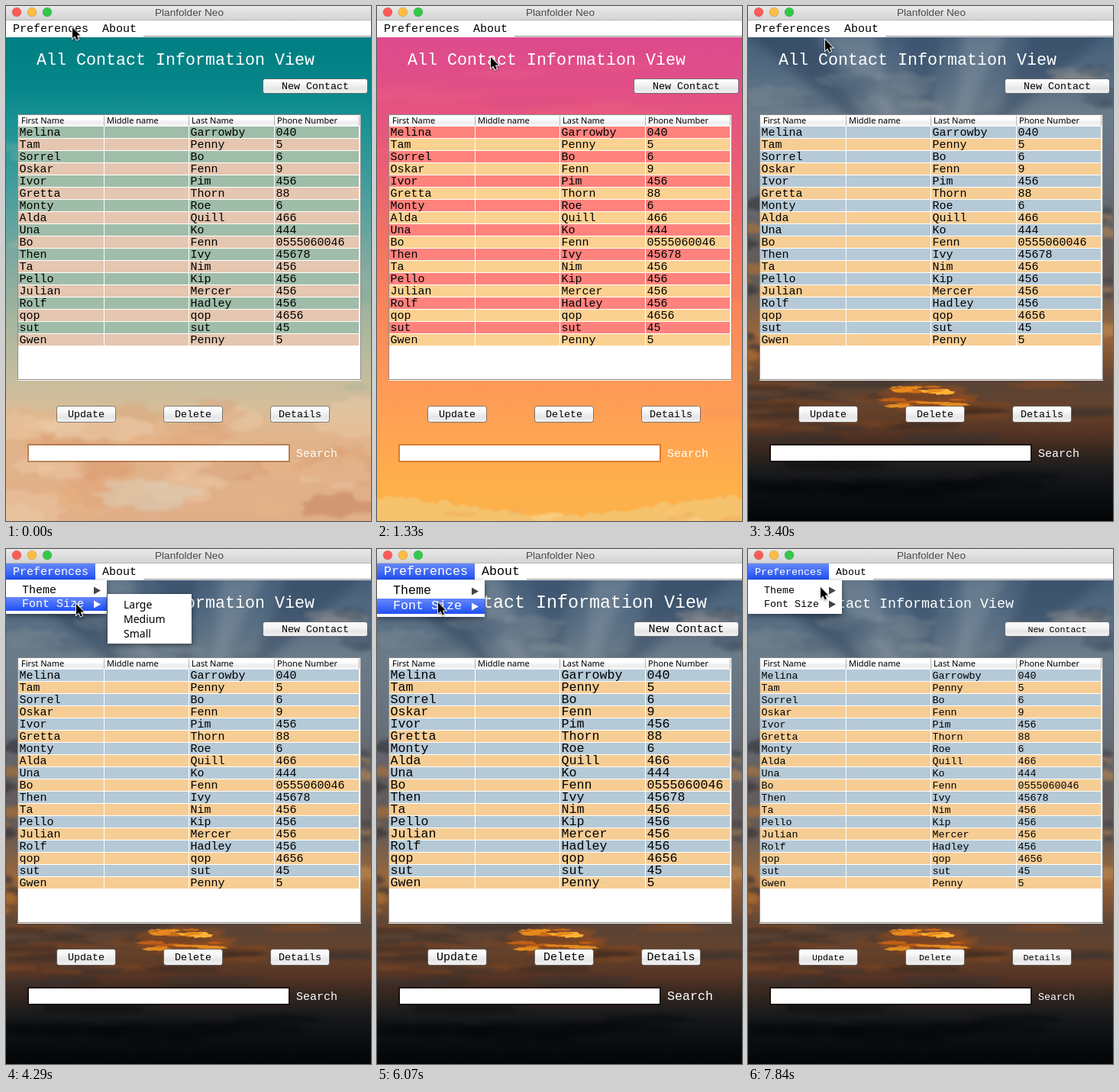
Write an HTML page with a canvas that moves like this. It is 478x675 px and loops after 7990 ms.

```html
<!DOCTYPE html>
<html>
<head>
<meta charset="utf-8">
<title>Planfolder Neo</title>
<style>
html, body { margin: 0; width: 100%; height: 100%; overflow: hidden; }
canvas { display: block; }
</style>
</head>
<body>
<canvas id="stage" width="478" height="675"></canvas>
<script>
const W = 478, H = 675, STEP = 148, LOOP = 7990;
const c = document.getElementById('stage').getContext('2d');
const MONO = '"Liberation Mono", monospace', SANS = '"Noto Sans", sans-serif';

const people = `Melina,Garrowby,040 Tam,Penny,5 Sorrel,Bo,6 Oskar,Fenn,9 Ivor,Pim,456 Gretta,Thorn,88
Monty,Roe,6 Alda,Quill,466 Una,Ko,444 Bo,Fenn,0555060046 Then,Ivy,45678 Ta,Nim,456 Pello,Kip,456
Julian,Mercer,456 Rolf,Hadley,456 qop,qop,4656 sut,sut,45 Gwen,Penny,5`.split(/\s+/).map(p => p.split(','));

const themes = [
  { rows: ['#9fbda9', '#e5c6b0'], edge: 'rgba(130,70,30,.45)', paint: paintDefault },
  { rows: ['#ff827d', '#fbd191'], edge: 'rgba(190,80,0,.5)', paint: paintSunrise },
  { rows: ['#b5c9d7', '#f6cd94'], edge: 'rgba(0,0,0,.55)', paint: paintSunset }
];
const menuItems = ['Theme', 'Font Size'];
const subItems = [['Sunrise', 'Sunset', 'Default'], ['Large', 'Medium', 'Small']];
// character advance of body and title text, height of a menu row
const sizes = [
  { body: 8, title: 11, row: 18 },
  { body: 9, title: 13, row: 18 },
  { body: 10, title: 14, row: 20 }
];

// state changes by step
const closed = { open: 0, item: -1, sub: -1, pick: -1 };
const opened = { bar: 1, open: 1 };
const changes = [
  [0, { theme: 0, size: 1, bar: 0, ...closed }],
  [1, opened], [2, { item: 0 }], [3, { sub: 0 }], [4, { pick: 0 }],
  [8, closed], [9, { theme: 1, bar: 0 }],
  [13, opened], [14, { item: 0 }], [15, { sub: 0 }], [16, { pick: 0 }],
  [17, { pick: 1 }], [19, { pick: 2 }], [20, { pick: 1 }],
  [22, closed], [23, { theme: 2, bar: 0 }],
  [25, opened], [26, { item: 0 }], [27, { item: 1 }], [28, { sub: 1 }],
  [31, { pick: 1 }], [32, { pick: 0 }],
  [35, closed], [36, { size: 2, bar: 0 }],
  [39, opened], [40, { item: 0 }], [41, { item: 1 }], [42, { sub: 1 }],
  [43, { pick: 0 }], [44, { pick: 1 }], [45, { pick: 2 }],
  [47, closed], [48, { size: 0, bar: 0 }],
  [52, opened]
];
// pointer path: step, x, y
const path = [
  [0, 87, 28], [1, 87, 30], [2, 88, 48], [3, 104, 55], [5, 228, 58], [6, 165, 60], [8, 165, 60],
  [9, 149, 67], [11, 88, 30], [13, 88, 30], [15, 105, 53], [16, 140, 54], [18, 161, 84],
  [19, 164, 97], [20, 164, 74], [22, 164, 74], [23, 101, 44], [24, 90, 30], [25, 90, 30],
  [27, 92, 68], [29, 92, 72], [31, 160, 88], [33, 155, 72], [35, 155, 72], [37, 86, 30],
  [39, 86, 30], [41, 80, 70], [43, 165, 75], [45, 190, 128], [46, 188, 113], [47, 188, 113],
  [50, 95, 30], [52, 93, 32], [53, 95, 50]
];

function pointerAt(step) {
  const i = path.findIndex(p => p[0] >= step);
  const b = path[i], a = path[Math.max(0, i - 1)];
  const f = b === a ? 0 : (step - a[0]) / (b[0] - a[0]);
  return [a[1] + (b[1] - a[1]) * f, a[2] + (b[2] - a[2]) * f];
}

let seed;
const rand = (lo = 0, hi = 1) => {
  seed = (seed * 16807) % 2147483647;
  return lo + (hi - lo) * seed / 2147483647;
};

function rect(x, y, w, h, fill) {
  c.fillStyle = fill;
  c.fillRect(x, y, w, h);
}

function text(s, x, y, font, fill = '#000', align = 'left') {
  c.font = font;
  c.fillStyle = fill;
  c.textAlign = align;
  c.fillText(s, x, y);
}

const mono = advance => `${advance / 0.6}px ${MONO}`;

function shade(y0, y1, ...stops) {
  const g = c.createLinearGradient(0, y0, 0, y1);
  stops.forEach((s, i) => Array.isArray(s) ? g.addColorStop((s[0] - y0) / (y1 - y0), s[1])
                                           : g.addColorStop(i / (stops.length - 1), s));
  return g;
}

// ragged paint patch
function patch(x, y, rx, ry, fill) {
  c.beginPath();
  for (let i = 0; i < 22; i++) {
    const a = i / 22 * 2 * Math.PI, r = rand(0.6, 1.05);
    c.lineTo(x + rx * r * Math.cos(a), y + ry * r * Math.sin(a));
  }
  c.fillStyle = fill;
  c.fill();
}

function patches(n, [x0, x1], [y0, y1], [r0, r1], flat, colours) {
  for (let i = 0; i < n; i++) {
    const r = rand(r0, r1);
    patch(rand(x0, x1), rand(y0, y1), r, r * flat, colours[i % colours.length]);
  }
}

function paintDefault() {
  rect(0, 41, W, H, shade(41, H, [41, '#007f83'], [110, '#07878a'], [145, '#179093'], [250, '#4a9f9e'],
    [340, '#83aaa0'], [420, '#a9b69d'], [490, '#c5bd9d'], [525, '#d6bd99'], [565, '#e2b48b'], [H, '#e0ae88']));
  c.filter = 'blur(2px)';
  patches(14, [0, W], [150, 520], [20, 70], 0.25, ['rgba(225,215,175,.15)', 'rgba(60,150,150,.1)']);
  patches(34, [0, W], [535, 675], [25, 75], 0.45,
    ['rgba(237,205,170,.4)', 'rgba(220,150,105,.28)', 'rgba(232,180,135,.4)']);
  patch(185, 640, 75, 24, 'rgba(220,203,180,.6)');
  patch(120, 555, 90, 18, 'rgba(238,210,178,.5)');
  patch(430, 655, 60, 18, 'rgba(196,132,96,.55)');
  patch(300, 608, 55, 16, 'rgba(205,145,105,.35)');
}

function paintSunrise() {
  rect(0, 41, W, H, shade(41, H, [41, '#dd4b8e'], [110, '#e24f86'], [200, '#ea5c74'], [300, '#f47062'],
    [400, '#fa8658'], [500, '#fd9a56'], [570, '#ffa552'], [630, '#ffb049'], [H, '#fbb14b']));
  c.filter = 'blur(3px)';
  patches(16, [0, W], [60, 560], [50, 130], 0.1, ['rgba(255,120,120,.12)', 'rgba(190,50,130,.08)']);
  c.filter = 'blur(1px)';
  c.beginPath();
  for (let x = 0; x < W + 10; x += 8) {
    const y = 664 - 12 * Math.cos(x / W * 2 * Math.PI), r = rand(5, 12);
    c.moveTo(x + r, y);
    c.arc(x, y, r, 0, 7);
    c.rect(x - 5, y, 10, 60);
  }
  c.fillStyle = 'rgba(243,200,120,.75)';
  c.fill();
  patches(10, [0, W], [662, 678], [12, 30], 0.3, ['rgba(235,170,90,.4)', 'rgba(255,220,150,.4)']);
}

function paintSunset() {
  rect(0, 41, W, H, shade(41, H, [41, '#47607a'], [90, '#556c82'], [140, '#6b7b89'], [230, '#66717c'],
    [300, '#625e60'], [370, '#635a55'], [430, '#9a673a'], [465, '#7d5233'], [495, '#584336'],
    [530, '#66422b'], [560, '#553424'], [585, '#33261f'], [610, '#191a1c'], [645, '#0a0e11'], [H, '#030506']));
  c.filter = 'blur(7px)';
  for (const [x, spread, tone] of [[40, 45, '30,50,75'], [130, 35, '150,160,170'], [225, 28, '45,68,95'],
                                   [310, 30, '145,158,170'], [420, 50, '40,62,88']]) {
    c.beginPath();
    c.moveTo(245 + (x - 245) * 0.4, 170);
    c.lineTo(x - spread, 35);
    c.lineTo(x + spread, 35);
    c.fillStyle = `rgba(${tone},.4)`;
    c.fill();
  }
  c.filter = 'blur(2px)';
  patches(10, [0, 330], [95, 145], [25, 60], 0.3, ['rgba(135,145,152,.3)', 'rgba(75,95,115,.3)']);
  patches(6, [420, W], [85, 140], [18, 40], 0.35, ['rgba(150,145,140,.4)', 'rgba(62,78,95,.45)']);
  patches(10, [-10, 20], [250, 480], [12, 30], 0.4, ['rgba(50,48,54,.6)', 'rgba(196,120,45,.5)']);
  patches(10, [460, 490], [255, 480], [12, 30], 0.4, ['rgba(190,140,85,.55)', 'rgba(65,66,74,.6)']);
  patches(30, [0, W], [490, 575], [30, 90], 0.09,
    ['rgba(60,52,48,.6)', 'rgba(142,76,32,.5)', 'rgba(50,38,34,.5)']);
  patches(8, [0, W], [590, 640], [50, 120], 0.1, ['rgba(0,3,6,.35)']);
  patch(240, 515, 75, 20, 'rgba(205,95,20,.3)');
  c.filter = 'blur(.7px)';
  patches(16, [195, 272], [497, 508], [8, 20], 0.14, ['#e8891c', '#c4661a', '#ffb335']);
  patches(10, [180, 290], [516, 525], [10, 24], 0.12, ['#bd5e17', '#e28a20']);
}

function drawFrame(title) {
  rect(0, 0, W, 19, shade(0, 19, '#e9e9e9', '#d3d3d3'));
  rect(0, 18, W, 1, '#b8b8b8');
  ['#fc5b57', '#fdbc40', '#34c84a'].forEach((fill, i) => {
    c.beginPath();
    c.arc(14 + 20 * i, 8, 6, 0, 7);
    c.fillStyle = fill;
    c.fill();
    c.lineWidth = 0.6;
    c.strokeStyle = 'rgba(0,0,0,.2)';
    c.stroke();
  });
  text(title, 240, 13, '13.6px "Liberation Sans", sans-serif', '#4a4a4a', 'center');
}

function drawMenuBar(s, a) {
  const split = 18 + 11 * a, end = split + 18 + 5 * a;
  rect(0, 19, W, 22, '#fff');
  rect(end, 39, W - end, 1, '#9a9a9a');
  rect(end, 40, W - end, 1, '#e4e4e4');
  if (s.bar) rect(0, 19, split, 21, blue(19, 40));
  text('Preferences', 9, 33.5, mono(a), s.bar ? '#fff' : '#000');
  text('About', split + 9, 33.5, mono(a));
}

const blue = (y0, y1) => shade(y0, y1, '#6688fa', '#1f50f3');

function button(label, x, y, w, h, a) {
  c.beginPath();
  c.roundRect(x + 0.5, y + 0.5, w - 1, h - 1, 3);
  c.fillStyle = shade(y, y + h, '#fff', '#f7f7f7', '#e6e6e6', '#f2f2f2');
  c.fill();
  c.lineWidth = 1;
  c.strokeStyle = 'rgba(70,70,70,.65)';
  c.stroke();
  text(label, x + w / 2, y + h / 2 + 3.5, mono(a - 1), '#000', 'center');
}

function drawTable(a, colours) {
  rect(15, 142, 450, 349, '#fff');
  c.lineWidth = 1;
  c.strokeStyle = '#8c8c8c';
  c.strokeRect(15.5, 142.5, 449, 347);
  rect(16, 143, 447, 15, shade(143, 158, '#fff', '#fff', '#ececec', '#fafafa'));
  const columns = [16, 129, 240, 352, 463];
  ['First Name', 'Middle name', 'Last Name', 'Phone Number'].forEach((label, i) => {
    text(label, columns[i] + (i ? 3 : 4), 154, '11px ' + SANS);
    rect(columns[i + 1] - 1, 144, 1, 13, '#b5b5b5');
  });
  people.forEach(([first, last, phone], r) => {
    const y = 158 + 16 * r;
    for (let i = 0; i < 4; i++)
      rect(columns[i], y, columns[i + 1] - columns[i] - 1, 15, colours[r % 2]);
    [first, '', last, phone].forEach((s, i) => text(s, columns[i] + 1.5, y + 12, mono(a)));
  });
}

function popup(x, y, w, h) {
  c.save();
  c.shadowColor = 'rgba(0,0,0,.45)';
  c.shadowBlur = 7;
  c.shadowOffsetY = 2;
  rect(x, y, w, h, '#fff');
  c.restore();
}

function drawMenu(s, a, row) {
  const w = 52 + 9 * a;
  popup(0, 41, w - 1, 8 + 2 * row);
  menuItems.forEach((label, i) => {
    const y = 45 + i * row, on = s.item === i, mid = y + row / 2 + 0.5;
    if (on) rect(0, y, w - 1, row, blue(y, y + row));
    text(label, 21, y + row / 2 + 4, mono(a), on ? '#fff' : '#000');
    c.beginPath();
    c.moveTo(w - 18, mid - 5);
    c.lineTo(w - 9, mid);
    c.lineTo(w - 18, mid + 5);
    c.fillStyle = on ? '#fff' : '#444';
    c.fill();
  });
  if (s.sub < 0) return;
  const top = 41 + s.sub * row, width = s.sub ? 110 : 98;
  popup(w, top, width, 65);
  subItems[s.sub].forEach((label, i) => {
    const y = top + 4 + 19 * i, on = s.pick === i;
    if (on) rect(w, y, width, 19, blue(y, y + 19));
    text(label, w + 21, y + 15, '14px ' + SANS, on ? '#fff' : '#000');
  });
}

function drawPointer(x, y) {
  c.save();
  c.translate(x, y);
  c.shadowColor = 'rgba(0,0,0,.4)';
  c.shadowBlur = 2;
  c.shadowOffsetY = 1;
  const arrow = new Path2D('M0 0V14.5L3.3 11.5 5.6 16.5 8 15.4 5.8 10.6H10.2Z');
  c.lineWidth = 1.8;
  c.strokeStyle = '#fff';
  c.stroke(arrow);
  c.shadowColor = 'transparent';
  c.fillStyle = '#000';
  c.fill(arrow);
  c.restore();
}

function draw(step) {
  const s = Object.assign({}, ...changes.filter(([k]) => k <= step).map(([, v]) => v));
  const { body: a, title, row } = sizes[s.size], theme = themes[s.theme];
  seed = 4711;
  theme.paint();
  c.filter = 'none';
  drawFrame('Planfolder Neo');
  drawMenuBar(s, a);
  text('All Contact Information View', 40, 77, mono(title), '#fff');
  button('New Contact', 336, 95, 138, 20, a);
  drawTable(a, theme.rows);
  ['Update', 'Delete', 'Details'].forEach((label, i) => button(label, 66 + 140 * i, 524, 78, 22, a));
  rect(28, 574, 344, 24, theme.edge);
  rect(30, 576, 340, 20, '#fff');
  text('Search', 380, 591, mono(a), '#fff');
  if (s.open) drawMenu(s, a, row);
  drawPointer(...pointerAt(step));
}

let shown = -1;
function tick(now) {
  const step = Math.min(53, Math.floor((now % LOOP + 8) / STEP));
  if (step !== shown) draw(shown = step);
  requestAnimationFrame(tick);
}
requestAnimationFrame(tick);
</script>
</body>
</html>
```
